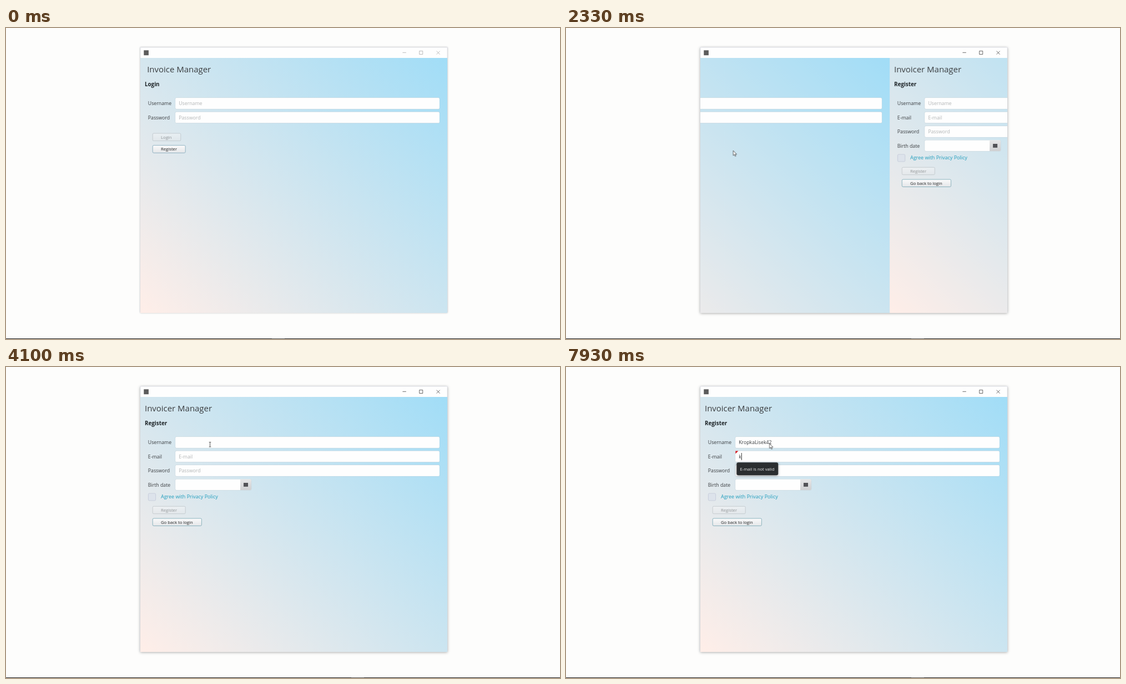
Recreate the animation shown at these times as an HTML page. Size 998 by 561 pixels, loop 8000 ms.

```html
<!DOCTYPE html>
<html lang="en">
<head>
<meta charset="utf-8">
<title>Invoice Manager</title>
<style>
  html, body { margin: 0; width: 100%; height: 100%; overflow: hidden; background: #fdfdfc; }
  svg { display: block; width: 998px; height: 561px; }
  text { font: 8.75px "Open Sans", "Noto Sans", sans-serif; fill: #3a3d40; white-space: pre; }
  .title { font-size: 14.95px; }
  .head { font-size: 9.8px; font-weight: 700; fill: #1c2226; }
  .prompt { fill: #b2b5b6; }
  .link { font-size: 8.97px; fill: #1f9dbd; }
  .small { font-size: 7.7px; fill: #222; }
  .tip { font-size: 7.6px; fill: #eee; }
  .field { fill: #fefefe; stroke: #b5c6cf; stroke-opacity: .4; stroke-width: .5; filter: drop-shadow(0 .5px .3px #7f98a680); }
  .button { fill: url(#silver); stroke: #7da5b8; stroke-width: .8; }
  .off { opacity: .42; }
  .off .button { stroke: #8d9499; }
  .controls { fill: none; stroke: #a0a0a0; stroke-width: .7; }
  .frame { fill: #fefefe; stroke: #d0d2df; stroke-width: .5; filter: drop-shadow(0 .5px 1.4px #0004); }
  .active .frame { filter: drop-shadow(0 1.2px 2.6px #0005); }
  .active .controls { stroke: #2a2a2a; }

  .slide, .cursor, .arrow, .beam, .active, .inactive, .hover, .nameprompt, .mailprompt, .invalid { animation: 8s infinite step-end; }
  .slide { animation-name: slide; }
  .cursor { animation-name: travel; animation-timing-function: ease-in-out; }
  .arrow { animation-name: arrow; }
  .beam { animation-name: beam; }
  .active { animation-name: activate; }
  .inactive { animation-name: deactivate; }
  .hover { animation-name: hover; }
  .nameprompt { animation-name: nameprompt; }
  .mailprompt { animation-name: mailprompt; }
  .invalid { animation-name: invalid; }

  /* quadratic start, linear middle, quadratic end */
  @keyframes slide {
    0% { transform: none; }
    26.62% { transform: none; animation-timing-function: cubic-bezier(.333, 0, .667, .333); }
    27.86% { transform: translateX(-69.1px); animation-timing-function: linear; }
    31.57% { transform: translateX(-483.9px); animation-timing-function: cubic-bezier(.333, .667, .667, 1); }
    32.81%, 100% { transform: translateX(-553px); }
  }
  @keyframes travel {
    0%, .75% { transform: translate(1005px, 430px); }
    8%, 17.5% { transform: translate(311px, 224px); }
    22.5%, 27.5% { transform: translate(300.6px, 222.2px); }
    31.25%, 34.4% { transform: translate(302.2px, 219.6px); }
    41.9%, 100% { transform: translate(366.6px, 138px); }
  }
  @keyframes arrow { 0% { opacity: 1; } 41.25% { opacity: 0; } 96.25%, 100% { opacity: 1; } }
  @keyframes beam { 0% { opacity: 0; } 41.25% { opacity: 1; } 96.25%, 100% { opacity: 0; } }
  @keyframes activate { 0% { opacity: 0; } 15.62%, 100% { opacity: 1; } }
  @keyframes deactivate { 0% { opacity: 1; } 15.62%, 100% { opacity: 0; } }
  @keyframes hover { 0% { opacity: 0; } 7.6% { opacity: 1; } 26.6%, 100% { opacity: 0; } }
  @keyframes nameprompt { 0% { opacity: 1; } 43.75%, 100% { opacity: 0; } }
  @keyframes mailprompt { 0% { opacity: 1; } 86.87%, 100% { opacity: 0; } }
  @keyframes invalid { 0% { opacity: 0; } 96.25%, 100% { opacity: 1; } }
</style>
</head>
<body>
<svg viewBox="0 0 998 561">
  <defs>
    <linearGradient id="sky" gradientUnits="userSpaceOnUse" x1="265.25" y1="537.25" x2="771.75" y2="30.75">
      <stop stop-color="#ffeee8"/><stop offset="1" stop-color="#a1ddf7"/>
    </linearGradient>
    <linearGradient id="silver" x2="0" y2="1">
      <stop stop-color="#fbfbfb"/><stop offset="1" stop-color="#e4e6e9"/>
    </linearGradient>
    <linearGradient id="steel" x2="0" y2="1">
      <stop stop-color="#e6e6e7"/><stop offset="1" stop-color="#cfd0d2"/>
    </linearGradient>
    <clipPath id="view"><path d="M242 54.5h553v459h-553z"/></clipPath>
    <rect id="sheet" x="242" y="54" width="553" height="460" fill="url(#sky)"/>
    <rect id="input" x="305" y="125.8" width="476" height="20.4" rx="2.2"/>
    <rect id="frame" x="242" y="35" width="553" height="478.6"/>
    <path id="controls" d="M714.4 44.3h6.4M744.7 41.5h6v6h-6zM775.6 41.6l6 6M781.6 41.6l-6 6"/>
    <rect id="task" y="560" width="23" height="1" fill="#4c4c4c"/>
  </defs>

  <rect width="998" height="561" fill="#fdfdfc"/>
  <rect y="560" width="998" height="1" fill="#1b1b1b"/>
  <g class="inactive">
    <use href="#task" x="479"/>
    <use class="frame" href="#frame"/>
    <use class="controls" href="#controls"/>
  </g>
  <g class="active">
    <use href="#task" x="622"/>
    <use class="frame" href="#frame"/>
    <use class="controls" href="#controls"/>
  </g>
  <rect x="248.3" y="40.2" width="8.6" height="9" fill="#5c5c5c"/>

  <g clip-path="url(#view)">
    <g class="slide">
      <g>
        <use href="#sheet"/>
        <text class="title" x="254.2" y="79.6">Invoice Manager</text>
        <text class="head" x="250" y="104.9">Login</text>
        <text x="255.8" y="139.3">Username</text>
        <text x="255.8" y="164.7">Password</text>
        <use class="field" href="#input"/>
        <use class="field" href="#input" y="25.4"/>
        <text class="prompt" x="311.2" y="139.3">Username</text>
        <text class="prompt" x="311.2" y="164.7">Password</text>
        <g class="off">
          <rect class="button" x="264.2" y="190" width="50.6" height="13.6" rx="2"/>
          <text class="small" x="279" y="199.5">Login</text>
        </g>
        <rect class="button" x="264.2" y="211.7" width="59" height="13.6" rx="2"/>
        <rect class="button hover" x="264.2" y="211.7" width="59" height="13.6" rx="2" style="stroke:#6a6a80"/>
        <text class="small" x="279" y="221.2">Register</text>
      </g>

      <g transform="translate(553)">
        <use href="#sheet"/>
        <text class="title" x="250" y="79.6">Invoicer Manager</text>
        <text class="head" x="250" y="104.9">Register</text>
        <text x="255.8" y="139.3">Username</text>
        <text x="255.8" y="164.7">E-mail</text>
        <text x="255.8" y="190.2">Password</text>
        <text x="255.8" y="215.6">Birth date</text>
        <use class="field" href="#input"/>
        <use class="field" href="#input" y="25.4"/>
        <use class="field" href="#input" y="50.9"/>
        <text class="prompt nameprompt" x="311.2" y="139.3">Username</text>
        <text class="prompt mailprompt" x="311.2" y="164.7">E-mail</text>
        <text class="prompt" x="311.2" y="190.2">Password</text>
        <rect class="field" x="305" y="202.3" width="137" height="20" rx="2.2"/>
        <path d="M422 202.5h18a2 2 0 0 1 2 2v15.6a2 2 0 0 1-2 2h-18z" fill="url(#steel)"/>
        <rect x="428" y="209" width="8" height="6.8" fill="#4c4c50"/>
        <path d="M428.5 211h7M428.5 213.3h7" stroke="#77777b" stroke-width=".4"/>
        <rect x="256.4" y="228" width="13.2" height="13" rx="1.8" fill="#dde3eb" stroke="#bfc5d6" stroke-width=".7"/>
        <text class="link" x="279" y="237.4">Agree with Privacy Policy</text>
        <g class="off">
          <rect class="button" x="264.2" y="251.3" width="59" height="13.4" rx="2"/>
          <text class="small" x="279" y="260.8">Register</text>
        </g>
        <rect class="button" x="264.2" y="273.1" width="88.2" height="13.4" rx="2" style="stroke:#74a5b1"/>
        <text class="small" x="279" y="282.6">Go back to login</text>

        <text id="name" x="311.2" y="139.3"></text>
        <text id="mail" x="311.2" y="164.7"></text>
        <path id="caret" d="M0 0v13" stroke="#222" stroke-width=".9"/>
        <g class="invalid">
          <path d="M305.4 151.6h5l-5 5z" fill="#d2141c"/>
          <rect x="307.4" y="172.2" width="74.8" height="23" rx="3" fill="#2b2e30" style="filter:drop-shadow(0 1.5px 2px #0006)"/>
          <text class="tip" x="313.6" y="186.6">E-mail is not valid</text>
        </g>
      </g>
    </g>
  </g>

  <g class="cursor">
    <path class="arrow" d="M0 0V8.8L2 7L3.5 10.2L4.9 9.6L3.5 6.5H6.2Z" fill="#fff" stroke="#222" stroke-width=".7"/>
    <path class="beam" d="M-.7-2.4H.9M.9-2.4H2.5M.9-2.4V6M-.7 6H2.5" fill="none" stroke="#222" stroke-width=".8"/>
  </g>
</svg>
<script>
  const LOOP = 8000, FOCUS = 3500, TYPE = 4500, KEY = 170, TAB = 6950, MAIL = 7700;
  const USER = 'KropkaLisek42';
  const [name, mail, caret] = ['name', 'mail', 'caret'].map(id => document.getElementById(id));

  function setText(node, value) {
    if (node.textContent !== value) node.textContent = value;
  }

  function draw() {
    const t = performance.now() % LOOP;
    const typed = Math.max(0, Math.min(USER.length, Math.floor((t - TYPE) / KEY) + 1));
    setText(name, USER.slice(0, typed));
    setText(mail, t >= MAIL ? 'k' : '');

    const inMail = t >= TAB;
    const lastInput = t >= MAIL ? MAIL : inMail ? TAB : typed ? TYPE + (typed - 1) * KEY : FOCUS;
    const field = inMail ? mail : name;
    const width = field.textContent ? field.getComputedTextLength() : 0;
    const shown = t >= FOCUS && (t - lastInput) % 1000 < 500;
    caret.setAttribute('transform', `translate(${311.7 + width} ${inMail ? 155 : 129.6})`);
    caret.setAttribute('visibility', shown ? 'visible' : 'hidden');
    requestAnimationFrame(draw);
  }
  draw();
</script>
</body>
</html>
```
